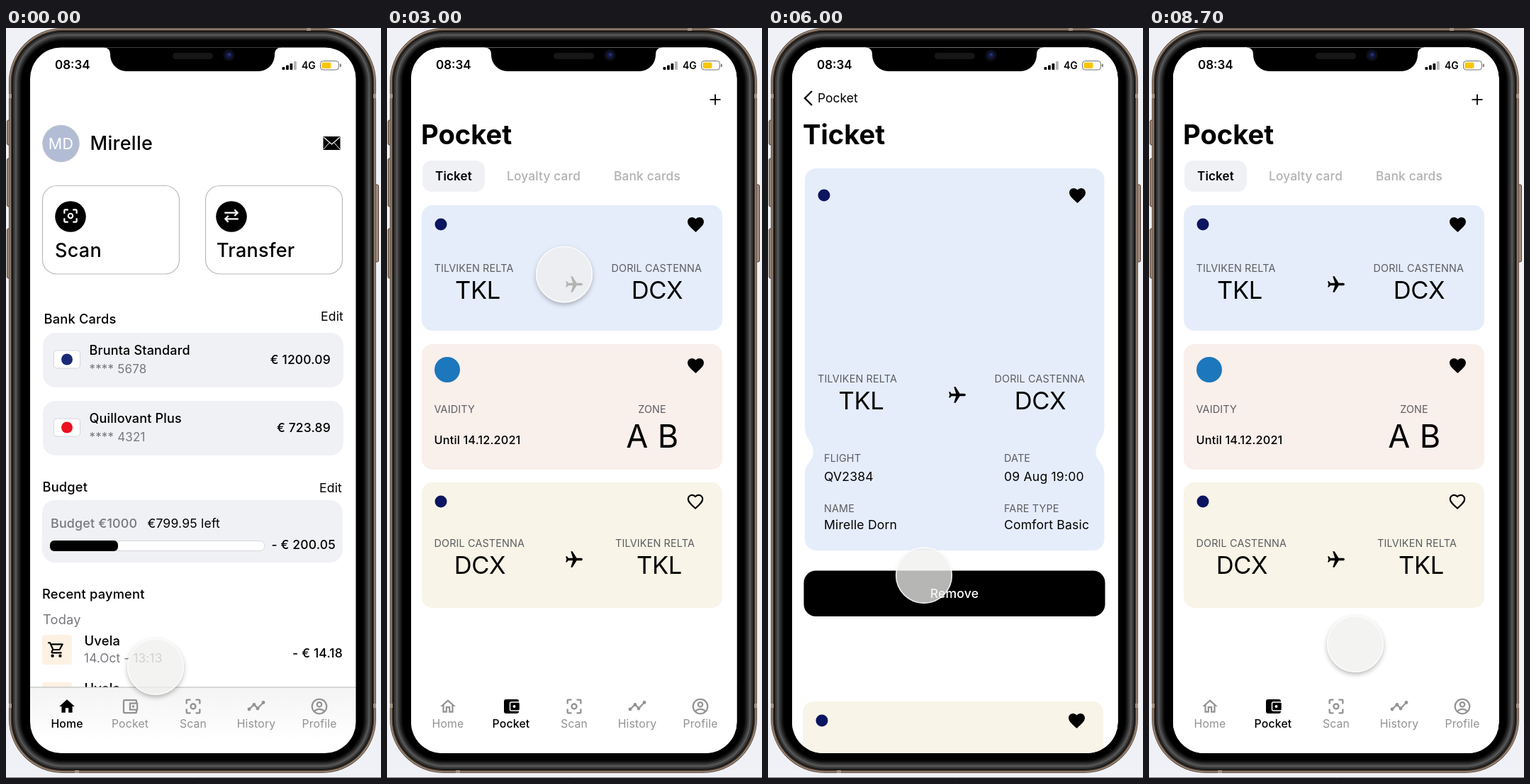
An HTML page with a canvas for the animation above (8.8 s loop, 529 by 1058 pixels).

```html
<!DOCTYPE html>
<html lang="en">
<head>
<meta charset="utf-8">
<title>Wallet app</title>
<style>
html, body { margin: 0; width: 100%; height: 100%; overflow: hidden; background: #eff1f6; }
canvas { display: block; width: 100vw; height: 100vh; }
</style>
</head>
<body>
<canvas id="stage"></canvas>
<script>
const W = 529, H = 1058, LOOP = 8800;
const dpr = window.devicePixelRatio || 1;
const GREY = '#77777d', LABEL = '#5c5c62', NAVY = '#0b1560';
const BLUE = '#e5edfb', CREAM = '#f8f4e7', PANEL = '#f0f1f5';
let g;

const ICON = {
  heart: new Path2D('M12 21.35l-1.45-1.32C5.4 15.36 2 12.28 2 8.5 2 5.42 4.42 3 7.5 3c1.74 0 3.41.81 4.5 2.09C13.09 3.81 14.76 3 16.5 3 19.58 3 22 5.42 22 8.5c0 3.78-3.4 6.86-8.55 11.54z'),
  plane: new Path2D('M21 16v-2l-8-5V3.5c0-.83-.67-1.5-1.5-1.5S10 2.67 10 3.5V9l-8 5v2l8-2.5V19l-2 1.5V22l3.5-1 3.5 1v-1.5L13 19v-5.5z'),
  home: new Path2D('M10 20v-6h4v6h5v-8h3L12 3 2 12h3v8z'),
  homeLine: new Path2D('M12 5.69l5 4.5V18h-2v-6H9v6H7v-7.81zM12 3L2 12h3v8h6v-6h2v6h6v-8h3z'),
  cart: new Path2D('M15.55 13c.75 0 1.41-.41 1.75-1.03l3.58-6.49A1 1 0 0 0 20.01 4H5.21l-.94-2H1v2h2l3.6 7.59-1.35 2.44C4.52 15.37 5.48 17 7 17h12v-2H7l1.1-2zM6.16 6h12.15l-2.76 5H8.53zM5 20a2 2 0 1 0 4 0 2 2 0 1 0-4 0zM15 20a2 2 0 1 0 4 0 2 2 0 1 0-4 0z'),
  scan: new Path2D('M4 9V5a1 1 0 0 1 1-1h4M15 4h4a1 1 0 0 1 1 1v4M20 15v4a1 1 0 0 1-1 1h-4M9 20H5a1 1 0 0 1-1-1v-4M9 12a3 3 0 1 0 6 0 3 3 0 1 0-6 0z'),
  swap: new Path2D('M3 8h17M16 4l4 4-4 4M21 16H4M8 12l-4 4 4 4'),
  wallet: new Path2D('M20 8V5a1 1 0 0 0-1-1H5a1 1 0 0 0-1 1v14a1 1 0 0 0 1 1h14a1 1 0 0 0 1-1v-3M12 8h9v8h-9z'),
  trend: new Path2D('M2.5 17l6.5-6.5 5 5 7.5-8'),
  person: new Path2D('M2.5 12a9.5 9.5 0 1 0 19 0 9.5 9.5 0 1 0-19 0M9 9.5a3 3 0 1 0 6 0 3 3 0 1 0-6 0M5.5 18.5c3-4 10-4 13 0')
};

function text(s, x, y, size, weight = 400, color = '#000', align = 'left', spacing = 0.01) {
  g.font = `${weight} ${size}px Inter, Roboto, sans-serif`;
  g.letterSpacing = size * spacing + 'px';
  g.textAlign = align;
  g.fillStyle = color;
  g.fillText(s, x, y);
}

function box(x, y, w, h, r, fill, stroke, lw = 1) {
  g.beginPath();
  g.roundRect(x, y, w, h, r);
  if (fill) { g.fillStyle = fill; g.fill(); }
  if (stroke) { g.strokeStyle = stroke; g.lineWidth = lw; g.stroke(); }
}

function dot(x, y, r, fill) {
  g.beginPath();
  g.arc(x, y, r, 0, Math.PI * 2);
  g.fillStyle = fill;
  g.fill();
}

function icon(name, x, y, size, color, line = 0, turn = 0) {
  g.save();
  g.translate(x, y);
  g.rotate(turn);
  g.scale(size / 24, size / 24);
  g.translate(-12, -12);
  g.fillStyle = g.strokeStyle = color;
  g.lineWidth = line;
  if (line) g.stroke(ICON[name]); else g.fill(ICON[name], 'evenodd');
  g.restore();
}

function lines(points, color, lw) {
  g.beginPath();
  points.forEach(([x, y], i) => i ? g.lineTo(x, y) : g.moveTo(x, y));
  g.strokeStyle = color;
  g.lineWidth = lw;
  g.stroke();
}

function layer(draw) {
  const c = document.createElement('canvas');
  c.width = W * dpr;
  c.height = H * dpr;
  g = c.getContext('2d');
  g.scale(dpr, dpr);
  draw();
  return c;
}

function nav(active) {
  const tint = i => i === active ? '#000' : '#929292';
  icon(active === 0 ? 'home' : 'homeLine', 86, 957, 26, tint(0));
  if (active === 1) {
    box(165, 947, 21, 20, 3, '#000');
    box(173.5, 951, 14, 12, 2, '#000', '#fff', 1.5);
    dot(179.5, 957, 2, '#fff');
  } else {
    icon('wallet', 175, 957, 27, tint(1), 2);
    dot(179.5, 957, 1.8, tint(1));
  }
  icon('scan', 264, 957, 28, tint(2), 2);
  icon('trend', 353, 956, 26, tint(3), 2);
  [[343, 961], [350, 954.5], [355, 960], [363, 951.5]].forEach(p => dot(...p, 2.4, tint(3)));
  icon('person', 442, 957, 26, tint(4), 2);
  ['Home', 'Pocket', 'Scan', 'History', 'Profile'].forEach((s, i) =>
    text(s, 86 + i * 89, 987, 15.8, i === active ? 500 : 400, tint(i), 'center'));
}

function payment(y) {
  box(51, y, 42, 42, 4, '#fdf1e3');
  icon('cart', 71, y + 21, 26, '#000');
  text('Uvela', 110.5, y + 15, 18.4, 500);
  text('14.Oct - 13:13', 110, y + 39, 17.2, 400, GREY);
  text('- € 14.18', 475, y + 32, 17.5, 500, '#000', 'right');
}

function bankCard(y, mark, name, digits, sum) {
  box(52, y, 424, 77, 18, PANEL);
  box(67.5, y + 25, 37, 25, 4, '#fff', '#d4d6dc');
  dot(86, y + 37.5, 8, mark);
  text(name, 117.5, y + 31, 18, 500);
  text(digits, 117.5, y + 57, 17, 400, GREY);
  text(sum, 458, y + 44, 17.5, 500, '#000', 'right');
}

function action(x, circleX, name, label, labelX) {
  box(x + .5, 222.5, 193, 124.5, 20, '#fff', '#b9b9bd', 1.2);
  dot(circleX, 266, 21.8, '#000');
  icon(name, circleX, 265, 26, '#fff', 2);
  text(label, labelX, 323, 27, 500);
}

function homePage() {
  g.fillStyle = '#fff';
  g.fillRect(0, 0, W, H);
  dot(77.5, 163, 26.3, '#bfc3cc');
  dot(77.5, 163, 25.3, '#b2bdd5');
  text('MD', 77.5, 171, 21.5, 400, '#fff', 'center');
  text('Mirelle', 118.5, 172, 27, 500);
  g.fillStyle = '#000';
  g.fillRect(447.5, 153, 24, 19);
  lines([[448, 154], [459.5, 164], [471, 154]], '#fff', 1.2);
  lines([[448, 171], [456, 162]], '#fff', 1);
  lines([[471, 171], [463, 162]], '#fff', 1);

  action(51, 91, 'scan', 'Scan', 69);
  action(281, 318, 'swap', 'Transfer', 297);

  text('Bank Cards', 53.5, 417, 18.3, 500);
  text('Edit', 476, 413, 17.6, 400, '#000', 'right');
  bankCard(430, '#1a2a78', 'Brunta Standard', '**** 5678', '€ 1200.09');
  bankCard(526, '#eb1020', 'Quillovant Plus', '**** 4321', '€ 723.89');

  text('Budget', 51.5, 654, 18.3, 500);
  text('Edit', 474, 655, 17.6, 400, '#000', 'right');
  box(51, 666, 424, 88, 18, PANEL);
  text('Budget €1000', 63, 705, 17.9, 500, GREY);
  text('€799.95 left', 199.5, 705, 17.6);
  box(62, 723.5, 303, 14, 7, '#fff', '#d6d7db');
  box(62, 723, 96, 15, 6, '#000');
  text('- € 200.05', 465, 735, 17.5, 500, '#000', 'right');

  text('Recent payment', 51, 805, 18.3, 500);
  text('Today', 52, 841, 18.3, 400, GREY);
  payment(856);
  payment(923);

  const bar = g.createLinearGradient(0, 930, 0, 1005);
  bar.addColorStop(0, '#f4f4f4');
  bar.addColorStop(1, '#fff');
  g.fillStyle = bar;
  g.fillRect(0, 930, W, 128);
  lines([[0, 930], [W, 930]], '#b6b6b8', 1);
  nav(0);
}

function place(name, code, x, codeX, y) {
  text(name, x, y, 14.4, 400, LABEL);
  text(code, codeX, y + 38, 34.5, 400, '#000', 'center', -0.01);
}

const HERE = ['TILVIKEN RELTA', 'TKL'], THERE = ['DORIL CASTENNA', 'DCX'];
const plane = (x, y) => icon('plane', x, y, 28.5, '#000', 0, Math.PI / 2);
const heart = (x, y) => icon('heart', x, y, 27.5, '#000');

function pocketPage() {
  g.fillStyle = '#fff';
  g.fillRect(0, 0, W, H);
  lines([[455.5, 101], [470.5, 101]], '#000', 1.8);
  lines([[463, 93.5], [463, 108.5]], '#000', 1.8);
  text('Pocket', 48, 164, 38.2, 700, '#000', 'left', 0);
  box(50, 187, 88, 44, 13, PANEL);
  text('Ticket', 94, 215, 17, 600, '#000', 'center');
  text('Loyalty card', 169, 215, 17.3, 500, '#b1b1b4');
  text('Bank cards', 320, 215, 17.3, 500, '#b1b1b4');

  box(49, 250, 424, 177, 15, BLUE);
  dot(76, 277, 8.5, NAVY);
  heart(435.5, 277.3);
  place(...HERE, 66.5, 128, 344);
  place(...THERE, 316.5, 381, 344);
  plane(264, 362);

  box(49, 446, 424, 177, 15, '#f9efeb');
  dot(85, 482, 18, '#1c77bc');
  heart(435.5, 476.3);
  text('VAIDITY', 66.5, 543, 14.4, 400, LABEL);
  text('Until 14.12.2021', 66.5, 587, 16.3, 500);
  text('ZONE', 374, 543, 14.4, 400, LABEL, 'center');
  text('A B', 374.5, 592, 45, 400, '#000', 'center');

  box(49, 641, 424, 177, 15, CREAM);
  dot(76, 668, 8.5, NAVY);
  icon('heart', 435, 668, 24.5, '#000', 2.1);
  place(...THERE, 66.5, 131, 732);
  place(...HERE, 322, 384, 732);
  plane(264, 750);
  nav(1);
}

function ticketPage() {
  g.fillStyle = '#fff';
  g.fillRect(0, 0, W, H);
  lines([[62, 89], [52, 99], [62, 109]], '#000', 2.4);
  text('Pocket', 70, 105, 17.5, 400, '#000', 'left', 0);
  text('Ticket', 49, 164, 38.2, 700, '#000', 'left', 0);

  const l = 52, r = 474.5, top = 198, low = 737, c = 16, mid = 598;
  g.beginPath();
  g.moveTo(l + c, top);
  g.arcTo(r, top, r, top + c, c);
  g.lineTo(r, mid - 36);
  g.bezierCurveTo(r, mid - 18, r - 12, mid - 14, r - 12, mid);
  g.bezierCurveTo(r - 12, mid + 14, r, mid + 14, r, mid + 34);
  g.arcTo(r, low, r - c, low, c);
  g.arcTo(l, low, l, low - c, c);
  g.lineTo(l, mid + 34);
  g.bezierCurveTo(l, mid + 14, l + 12, mid + 14, l + 12, mid);
  g.bezierCurveTo(l + 12, mid - 14, l, mid - 18, l, mid - 36);
  g.arcTo(l, top, l + c, top, c);
  g.fillStyle = BLUE;
  g.fill();

  dot(79, 236, 8.5, NAVY);
  heart(436.5, 236.3);
  place(...HERE, 70, 131.5, 500);
  place(...THERE, 319.5, 384, 500);
  plane(267, 518);
  [['FLIGHT', 'QV2384', 79, 612, 639], ['DATE', '09 Aug 19:00', 333, 612, 639],
   ['NAME', 'Mirelle Dorn', 79, 683, 707], ['FARE TYPE', 'Comfort Basic', 333, 683, 707]]
    .forEach(([k, v, x, y1, y2]) => {
      text(k, x, y1, 14.4, 400, LABEL);
      text(v, x, y2, 17.6);
    });
  box(50.5, 765.5, 425, 64.5, 17, '#000');
  text('Remove', 263, 804, 17.6, 500, '#fff', 'center');
  box(49, 950, 424, 177, 15, CREAM);
  dot(76, 977, 8.5, NAVY);
  heart(435.5, 977.3);
}

function phoneFrame() {
  g.fillStyle = '#eff1f6';
  g.fillRect(0, 0, W, H);
  lines([[0, 1057.5], [W, 1057.5]], '#77777a', 1);
  [[130, 35], [184, 68], [283, 70]].forEach(([y, h]) => box(1.5, y, 5, h, 2, '#a48e7e', '#4b3a30'));
  box(519, 221, 6.5, 109, 2, '#a48e7e', '#4b3a30');
  // metal rim fading into the black bezel
  [[0, '#5a483d'], [1, '#a3907f'], [2.5, '#4d3f36'], [4, '#1a1715'], [6, '#383838'],
   [8.5, '#565656'], [11, '#3c3c3c'], [13.5, '#1f1f1f'], [16, '#0a0a0a'], [18, '#000']]
    .forEach(([d, color]) => box(4 + d, d, 518 - 2 * d, 1051 - 2 * d, 76 - d, color));
  g.fillStyle = '#a3907f';
  g.fillRect(424, 0, 6, 4);
  g.fillRect(97, 1047, 6, 4);
  [93, 953].forEach(y => { g.fillRect(4, y, 4, 6); g.fillRect(518, y, 4, 6); });
}

function overlay() {
  g.beginPath();
  g.moveTo(138, 26);
  g.lineTo(388, 26);
  g.lineTo(388, 27.5);
  g.quadraticCurveTo(379, 28, 379, 37);
  g.arcTo(379, 61, 357, 61, 23);
  g.arcTo(147, 61, 147, 38, 23);
  g.lineTo(147, 37);
  g.quadraticCurveTo(147, 28, 138, 27.5);
  g.fillStyle = '#000';
  g.fill();
  box(235, 35, 57, 9, 4.5, '#161616');
  dot(314.5, 38.5, 8, '#0d0e18');
  dot(314.5, 38.5, 4.5, '#141a48');
  dot(315, 37.5, 1.8, '#2c3680');

  text('08:34', 69, 58, 17, 600, '#000', 'left', 0);
  [4, 6.5, 9, 12].forEach((h, i) =>
    box(389.5 + i * 5.5, 59 - h, 3.8, h, 1, i < 3 ? '#000' : '#b5b5b5'));
  text('4G', 417, 58, 14, 600, '#000', 'left', 0);
  box(443.5, 46.5, 26, 12.5, 4, '#fff', '#6f6f6f');
  box(445.5, 48.5, 13, 8.5, 2, '#fac60a');
  box(471, 50.5, 1.8, 4.5, 1, '#6f6f6f');
}

const stage = document.getElementById('stage');
stage.width = W * dpr;
stage.height = H * dpr;
const pen = stage.getContext('2d');
pen.scale(dpr, dpr);

const frame = layer(phoneFrame), status = layer(overlay);
const pages = [homePage, pocketPage, ticketPage].map(layer);
const FADE = 250;
// start time and page shown from then on
const visits = [[-FADE, 0], [1500, 1], [3400, 2], [6420, 1]];

// time, x, y, opacity, lift
const touch = [
  [0, 211, 901, .75, 1], [600, 172, 979, .75, 1], [1050, 172, 979, .75, 1],
  [1300, 172, 979, .52, 0], [1900, 172, 979, .6, 0], [2800, 250, 347.5, .75, 1],
  [3050, 250, 347.5, .75, 1], [3300, 250, 347.5, .72, 0], [4200, 257, 347.5, .72, 0],
  [4700, 257, 347.5, .72, 0], [5600, 220, 772, .76, .3], [6000, 220, 772, .76, .3],
  [6380, 103, 99, .75, 1], [7400, 103, 99, .75, 1], [8700, 291, 869, .75, 1],
  [8800, 291, 869, .75, 1]
];

function touchAt(t) {
  const i = touch.findIndex(k => k[0] > t);
  const a = touch[i - 1], b = touch[i];
  const u = (t - a[0]) / (b[0] - a[0]), e = u * u * (3 - 2 * u);
  return a.map((v, n) => v + (b[n] - v) * e);
}

function drawTouch(t) {
  const [, x, y, alpha, lift] = touchAt(t);
  const ring = r => { pen.beginPath(); pen.arc(x, y, r, 0, Math.PI * 2); };
  if (lift > 0) {
    // shadow only outside the disc
    pen.save();
    pen.beginPath();
    pen.rect(0, 0, W, H);
    pen.arc(x, y, 40, 0, Math.PI * 2, true);
    pen.clip('evenodd');
    pen.shadowColor = `rgba(0,0,0,${.3 * lift})`;
    pen.shadowBlur = 7 * dpr;
    pen.shadowOffsetY = 3 * dpr;
    ring(39.5);
    pen.fillStyle = '#fff';
    pen.fill();
    pen.restore();
  }
  ring(40);
  pen.fillStyle = `rgba(239,239,238,${alpha})`;
  pen.fill();
  ring(39.3);
  pen.strokeStyle = `rgba(255,255,255,${alpha})`;
  pen.lineWidth = 1.6;
  pen.stroke();
}

function draw(now) {
  const t = now % LOOP;
  const put = c => pen.drawImage(c, 0, 0, W, H);
  put(frame);
  pen.save();
  pen.beginPath();
  pen.roundRect(34, 27.5, 459.5, 995.5, 44);
  pen.clip();
  for (const [start, page] of visits) {
    if (t < start) break;
    pen.globalAlpha = Math.min(1, (t - start) / FADE);
    put(pages[page]);
  }
  pen.globalAlpha = 1;
  put(status);
  drawTouch(t);
  pen.restore();
}

const begin = performance.now();
function tick() {
  draw(performance.now() - begin);
  requestAnimationFrame(tick);
}
tick();
</script>
</body>
</html>
```
